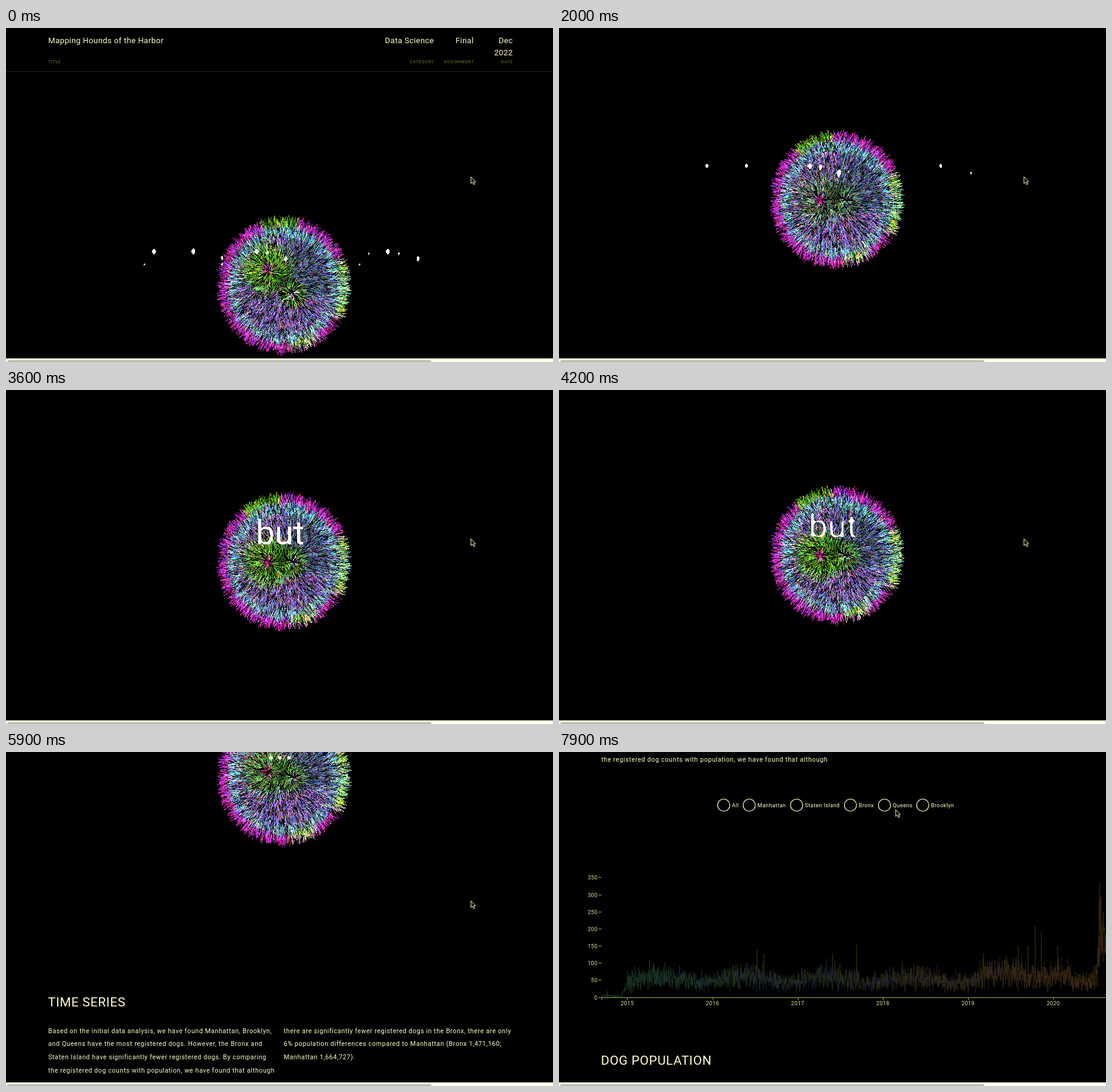
These frames come from a looping animation (900x550 px, 8 s). An HTML page with a canvas:

```html
<!DOCTYPE html>
<html lang="en">
<head>
<meta charset="utf-8">
<title>Dog data story</title>
<style>
html, body { margin: 0; width: 900px; height: 550px; overflow: hidden; background: #000; }
#stage { position: relative; width: 900px; height: 550px; overflow: hidden; background: #000;
  font-family: Roboto, "Liberation Sans", sans-serif; }
#page { position: absolute; left: 0; top: 0; width: 900px; height: 1460px; }
#page > * { position: absolute; left: 0; top: 0; }
#fur { left: 328px !important; top: 294px !important; }
#chart { top: 1090px !important; }
#words { top: 330px !important; width: 900px; height: 90px; filter: url(#cut) blur(.5px); }
#words span { position: absolute; left: 1px; top: 13px; width: 900px; text-align: center;
  font-size: 56px; line-height: 66px; color: #fffff2; white-space: pre; }
text { fill: #ffffc8; white-space: pre; }
.head { font-size: 13px; letter-spacing: .4px; }
.label { font-size: 7px; letter-spacing: .6px; fill: #77771c; }
.title { font-size: 21px; letter-spacing: .6px; }
.body { font-size: 10.5px; letter-spacing: .6px; }
.small { font-size: 9px; letter-spacing: .4px; }
.axis { font-size: 9px; letter-spacing: .4px; fill: #e4e494; }
#cursor { position: absolute; left: 0; top: 0; }
#bar { position: absolute; left: 0; top: 544px; width: 900px; height: 6px; background: #fffff0;
  box-shadow: inset 0 1px #f4f4a8; }
#bar i { position: absolute; left: 2px; top: 3px; width: 698px; height: 3px; border-radius: 3px 3px 0 0; background: #bdbdb0; }
</style>
</head>
<body>
<div id="stage">
  <div id="page">
    <canvas id="fur" width="260" height="260"></canvas>
    <canvas id="chart" width="900" height="230"></canvas>
    <svg id="copy" width="900" height="1460">
      <defs>
        <filter id="cut" color-interpolation-filters="sRGB">
          <feColorMatrix values="1 0 0 0 0  0 1 0 0 0  0 0 1 0 0  0 0 0 255 -140"/>
        </filter>
      </defs>
      <path d="M0 71.5H900" stroke="#4a4a28" stroke-dasharray="1 1"/>
    </svg>
    <div id="words"></div>
  </div>
  <svg id="cursor" width="14" height="18">
    <path d="M1 1V12.2L3.6 9.8L5.4 13.8L7.3 13L5.6 9.2H8.6Z" fill="#000" stroke="#ffffc0"/>
  </svg>
  <div id="bar"><i></i></div>
</div>
<script>
const LOOP = 8000, STEP = 100, TAU = Math.PI * 2;
const $ = id => document.getElementById(id);
const clamp = v => Math.max(0, Math.min(1, v));
const smooth = v => { v = clamp(v); return v * v * (3 - 2 * v); };

function random(seed) {
  return () => {
    seed = (seed + 0x6D2B79F5) | 0;
    let n = Math.imul(seed ^ (seed >>> 15), 1 | seed);
    n = (n + Math.imul(n ^ (n >>> 7), 61 | n)) ^ n;
    return ((n ^ (n >>> 14)) >>> 0) / 4294967296;
  };
}

// value at time t along [time, value] keys
function along(keys, t) {
  let i = 1;
  while (i < keys.length - 1 && keys[i][0] < t) i++;
  const [a, u] = keys[i - 1], [b, v] = keys[i];
  return u + (v - u) * clamp((t - a) / (b - a));
}

function node(tag, attrs) {
  const n = document.createElementNS("http://www.w3.org/2000/svg", tag);
  for (const k in attrs) n.setAttribute(k, attrs[k]);
  return $("copy").appendChild(n);
}
function write(x, y, str, kind, anchor = "start") {
  node("text", { x, y, class: kind, "text-anchor": anchor }).textContent = str;
}

// ---- page copy
write(69.5, 25, "Mapping Hounds of the Harbor", "head");
write(704, 25, "Data Science", "head", "end");
write(769.5, 25, "Final", "head", "end");
write(834, 25, "Dec", "head", "end");
write(834, 45, "2022", "head", "end");
write(69.5, 58, "TITLE", "label");
write(704, 58, "CATEGORY", "label", "end");
write(770, 58, "ASSIGNMENT", "label", "end");
write(834, 58, "DATE", "label", "end");
write(69, 802, "TIME SERIES", "title");
write(69, 1410, "DOG POPULATION", "title");
[
  "Based on the initial data analysis, we have found Manhattan, Brooklyn,",
  "and Queens have the most registered dogs. However, the Bronx and",
  "Staten Island have significantly fewer registered dogs. By comparing",
  "the registered dog counts with population, we have found that although"
].forEach((s, i) => write(69.5, 845.5 + i * 21.7, s, "body"));
[
  "there are significantly fewer registered dogs in the Bronx, there are only",
  "6% population differences compared to Manhattan (Bronx 1,471,160;",
  "Manhattan 1,664,727)."
].forEach((s, i) => write(457, 845.5 + i * 21.7, s, "body"));
[["All", 271], ["Manhattan", 313], ["Staten Island", 391], ["Bronx", 479.5], ["Queens", 535.5], ["Brooklyn", 598.5]]
  .forEach(([name, x]) => {
    node("circle", { cx: x, cy: 982.5, r: 10, fill: "none", stroke: "#ffffc0", "stroke-width": 1.2 });
    write(x + 13.5, 986, name, "small");
  });
for (let i = 0; i < 8; i++) write(63.5, 1302.5 - i * 28.15, i * 50, "axis", "end");
for (let i = 0; i < 6; i++) write(112.3 + i * 140.2, 1312, 2015 + i, "axis", "middle");

// ---- time series
function drawChart() {
  const c = $("chart").getContext("2d"), base = 209.5;
  const spikes = [[326, 140], [337, 128], [450, 130], [490, 155], [756, 152], [772, 152], [783.4, 210], [793.7, 191], [820, 150]];
  const level = x => {
    if (x < 104) return 5;
    if (x < 112) return 14 + (x - 104) * 2;
    if (x > 886) return 150 + 90 * Math.exp(-Math.abs(x - 891) / 3);
    if (x > 842) return 48 + Math.max(0, x - 870);
    return 54 + (x > 690 ? 14 : 0) + 10 * Math.sin(TAU * (x - 130) / 140);
  };
  const tones = [["#1f4a1c", "#34380e", "#463c0e"], ["#1d3f40", "#272a4c", "#502a18"]];
  tones.forEach((tone, k) => {
    const rnd = random(31 + k);
    let px = 70, py = base;
    c.lineWidth = .6;
    c.globalAlpha = k ? .75 : 1;
    for (let part = 0; part < 3; part++) {
      const g = c.createLinearGradient(70, 0, 900, 0);
      tone.forEach((s, i) => g.addColorStop(i / 2, s));
      c.strokeStyle = g;
      c.beginPath();
      c.moveTo(px, py);
      for (const end = 70 + 278 * (part + 1); px < end;) {
        px += .62;
        const m = level(px), n = rnd() + rnd() - 1;
        let v = m + n * (m < 20 ? 5 : m * .72);
        if (rnd() < .012) v = m < 20 ? 20 : m * (rnd() < .4 ? .25 : 1.8);
        if (!k) for (const [sx, sv] of spikes) if (Math.abs(px - sx) < .32) v = sv;
        if (!k && Math.abs(px - 891.5) < .35) v = 297;
        py = base - Math.max(1, v) * .563;
        c.lineTo(px, py);
      }
      c.stroke();
    }
  });
  c.globalAlpha = 1;
  c.lineWidth = 1;
  c.strokeStyle = "#a8a84c";
  c.beginPath();
  c.moveTo(70, base); c.lineTo(900, base);
  c.moveTo(70.5, base); c.lineTo(70.5, base + 4);
  for (let i = 0; i < 8; i++) {
    const y = Math.round(base - i * 28.15) - .5;
    c.moveTo(65, y); c.lineTo(70, y);
  }
  for (let i = 0; i < 6; i++) {
    const x = Math.round(112.3 + i * 140.2) + .5;
    c.moveTo(x, base); c.lineTo(x, base + 4);
  }
  c.stroke();
}
drawChart();

// ---- fur ball
const MAGENTA = [212, 42, 205], GREEN = [92, 176, 34], LIME = [160, 235, 85], CYAN = [105, 185, 208],
  MINT = [120, 235, 185], BODY = [108, 108, 158], PLUM = [128, 86, 165], STEEL = [84, 106, 146];
const blend = (a, b, k) => a.map((v, i) => v + (b[i] - v) * k);
const within = (v, lo, hi, soft) => smooth((v - lo + soft) / (2 * soft)) * smooth((hi + soft - v) / (2 * soft));

function coat(x, y, r, deg, turn) {
  let c = blend(BODY, x > 0 && y < 20 ? STEEL : PLUM, .6);
  c = blend(c, CYAN, within(r, .74, .88, .06) * .75);
  let rim = blend(MAGENTA, GREEN, within(deg, -130 + turn, -94 + turn, 3));
  rim = blend(rim, LIME, within(deg, -24, 30, 5));
  rim = blend(rim, MINT, within(deg, -9, 14, 6) * smooth((r - .9) * 12));
  c = blend(c, rim, smooth((r - .84) / .09));
  return blend(c, LIME, within(deg, 58, 83, 7) * within(r, .83, .98, .05) * .85);
}

const hairs = (() => {
  const rnd = random(7), list = [];
  for (let i = 0; i < 7000; i++) {
    const r = Math.sqrt(rnd()), a = rnd() * TAU - Math.PI, deg = a * 360 / TAU;
    const x = r * 98 * Math.cos(a), y = r * 102 * Math.sin(a);
    const gap = Math.hypot(x + 3, (y + 7) * 1.1);
    const light = (.14 + 1.4 * Math.pow(rnd(), .85)) * (1 - .6 * Math.exp(-gap * gap / 220)) *
      (x > 15 && r < .7 && y < 15 ? .82 : 1);
    list.push({
      r, x, y, bend: (rnd() - .5) * .9, phase: rnd() * TAU,
      len: (7 + 6.5 * r * r) * (.65 + rnd() * .55),
      mix: [0, 0, 0].map(() => light * (.5 + rnd() * 1.05)),
      rest: coat(x, y, r, deg, 0), turned: coat(x, y, r, deg, 18)
    });
  }
  return list.sort((p, q) => q.r - p.r);
})();

const leftY = [[0, -26], [1000, -8], [1800, 0], [5000, 0], [5900, -9], [8000, -9]];
const rightY = [[0, 13], [1000, 0], [8000, 0]];
const greenKeys = [[0, 1], [1000, .75], [2000, .5], [3000, .95], [4200, 1], [5900, .75], [8000, .75]];
const turnKeys = [[0, 1], [1000, .1], [2000, 0], [8000, 0]];
const PINK = [255, 45, 170], WHITE = [225, 255, 245];

const pen = $("fur").getContext("2d"), image = pen.createImageData(260, 260);
const pixels = new Uint32Array(image.data.buffer);
const rgb = [0, 0, 0];

function drawFur(t) {
  const y1 = along(leftY, t), y2 = along(rightY, t);
  const glow = along(greenKeys, t), turn = along(turnKeys, t);
  pixels.fill(0);
  for (const h of hairs) {
    const ax = h.x + 26, ay = h.y - y1, bx = h.x - 14, by = h.y - y2;
    const d1 = Math.sqrt(ax * ax + ay * ay) + .01, d2 = Math.sqrt(bx * bx + by * by) + .01;

    // colour: coat, then the green, pink and white around the two whorls
    const near = d1 < 50 || d2 < 27;
    const g1 = near ? glow * .95 * (1 - smooth((d1 - 20) / 30)) : 0;
    const g2 = near ? glow * .8 * (1 - smooth((d2 - 9) / 18)) : 0;
    const green = 1 - (1 - g1) * (1 - g2);
    const pink = d1 < 8 ? 1 - smooth((d1 - 2) / 6) : 0;
    const white = d2 < 9 ? 1 - smooth((d2 - 2) / 7) : 0;
    for (let i = 0; i < 3; i++) {
      let v = h.rest[i] + (h.turned[i] - h.rest[i]) * turn;
      v += (GREEN[i] - v) * green;
      v += (PINK[i] - v) * pink;
      v += (WHITE[i] - v) * white;
      rgb[i] = Math.min(255, v * h.mix[i] * 1.1) | 0;
    }
    const ink = (255 << 24 | rgb[2] << 16 | rgb[1] << 8 | rgb[0]) >>> 0;

    // direction: outwards from the ball and from each whorl
    const k1 = Math.exp(-d1 / 26) / d1, k2 = Math.exp(-d2 / 18) / d2, out = h.r * .011;
    const sway = .16 * Math.sin(t * TAU / 1600 + h.phase) + .14 * Math.sin(t * TAU / 4000 + h.x * .04 + h.y * .03);
    const dir = Math.atan2(h.y * out + ay * k1 + by * k2, h.x * out + ax * k1 + bx * k2) + h.bend * .6 + sway;
    const cx = Math.cos(dir), cy = Math.sin(dir), curl = h.bend * .3 / h.len;
    for (let s = 0; s < h.len; s++) {
      const side = curl * s * s * .5;
      const x = 129.5 + h.x + cx * s - cy * side | 0, y = 130 + h.y + cy * s + cx * side | 0;
      pixels[y * 260 + x] = ink;
    }
  }
  pen.putImageData(image, 0, 0);
}

// ---- melting words
const MORPH = 700, TURN = 2275, START = -500;
const words = ["out of all the countries", "but", "..."].map(str => {
  const s = document.createElement("span");
  s.textContent = str;
  return $("words").appendChild(s);
});
function drawWords(t) {
  words.forEach((s, i) => {
    const from = START + i * TURN;
    const f = Math.min(clamp((t - from) / MORPH), 1 - clamp((t - from - TURN) / MORPH));
    s.style.display = f > .25 ? "block" : "none";
    s.style.opacity = Math.pow(f, .4);
    s.style.filter = f < 1 && f > .25 ? `blur(${(8 / f - 8).toFixed(2)}px)` : "none";
  });
}

// ---- whole picture
const scrollKeys = [[0, 0], [1000, 38], [1800, 141], [3900, 141], [4200, 152], [4500, 200], [5400, 345],
  [5900, 383], [6300, 911], [7200, 911], [7500, 895], [8000, 895]];

function draw(t) {
  const top = Math.round(along(scrollKeys, t)), ball = top < 545;
  $("page").style.transform = `translateY(${-top}px)`;
  $("words").style.display = ball ? "block" : "none";
  if (ball) {
    drawFur(t);
    drawWords(t);
  }
  const k = smooth((t - 6500) / 1000);
  $("cursor").style.transform = `translate(${Math.round(764 - 211 * k)}px, ${Math.round(244 - 150 * k)}px)`;
}

let shown = 0;
function frame(now) {
  const step = Math.floor((now % LOOP) / STEP);
  if (step !== shown) draw((shown = step) * STEP);
  requestAnimationFrame(frame);
}
draw(0);
requestAnimationFrame(frame);
</script>
</body>
</html>
```
